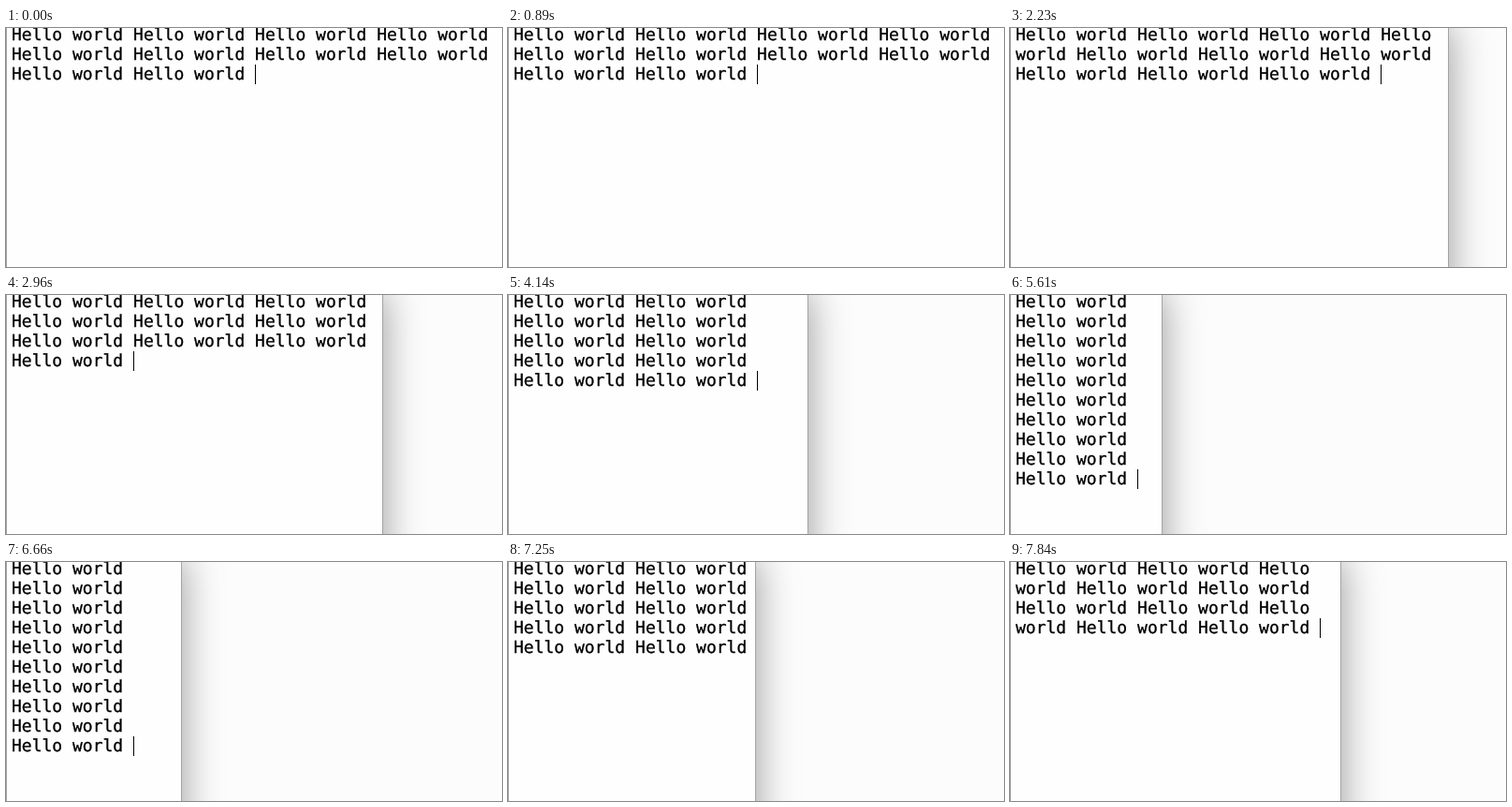
An HTML page that plays this animation: 530 px wide and 255 px high, repeating every 7990 ms.

```html
<!DOCTYPE html>
<html lang="en">
<head>
<meta charset="utf-8">
<title>Text reflow</title>
<style>
html, body { margin: 0; width: 100%; height: 100%; overflow: hidden; }
#stage { position: relative; width: 100%; height: 100%; overflow: hidden; contain: strict; background: #fcfcfc; }
#win {
  position: absolute; left: 0; top: -25px; height: 340px; overflow: hidden;
  box-sizing: border-box; background: #fefefe;
  border: solid #a4a4a4; border-width: 0 1px;
  box-shadow: 0 21px 40px rgba(0, 0, 0, .4);
}
#text {
  position: absolute; left: 5px; top: 22px; margin: 0; color: #000;
  font: 18px/21px "DejaVu Sans Mono", monospace;
  text-rendering: geometricPrecision; -webkit-text-stroke: .3px #000;
}
#caret { position: absolute; width: 1px; height: 21px; background: #000; }
</style>
</head>
<body>
<div id="stage"><div id="win"><pre id="text"></pre><div id="caret"></div></div></div>
<script>
const LOOP = 7990, STEP = 148, CHAR = 18 * 0.602, LINE = 21, PAD = 6, TOP = 22;
const words = "Hello world ".repeat(10).trim().split(" ");
const [win, text, caret] = ["win", "text", "caret"].map(id => document.getElementById(id));

// Drag path: [step, right edge of the window]
const path = [[11, 531], [13, 492], [14, 492], [15, 468], [20, 402], [22, 359], [28, 320],
  [34, 207], [37.2, 162], [44, 162], [45, 187], [52, 321], [53, 353]];

function edgeAt(step) {
  const i = path.findIndex(([at]) => at >= step);
  if (i === 0) return path[0][1];
  if (i < 0) return path[path.length - 1][1];
  const [a, x] = path[i - 1], [b, y] = path[i];
  return Math.round(x + (y - x) * (step - a) / (b - a));
}

function wrap(cols) {
  const lines = [""];
  for (const word of words) {
    const last = lines.length - 1;
    if (lines[last] && lines[last].length + word.length > cols) lines.push(word + " ");
    else lines[last] += word + " ";
  }
  return lines;
}

function draw(time) {
  const step = Math.floor((time % LOOP + 14) / STEP);
  const edge = edgeAt(step);
  const lines = wrap(Math.floor((edge - PAD) / CHAR));
  const last = lines.length - 1;
  win.style.width = edge + 1 + "px";
  text.textContent = lines.join("\n");
  caret.style.left = Math.floor(PAD + lines[last].length * CHAR) - 1 + "px";
  caret.style.top = TOP + last * LINE + "px";
  caret.style.visibility = step >= 2 && step < 6 ? "hidden" : "visible";
}

const start = performance.now();
function tick() {
  draw(performance.now() - start);
  requestAnimationFrame(tick);
}
tick();
</script>
</body>
</html>
```
